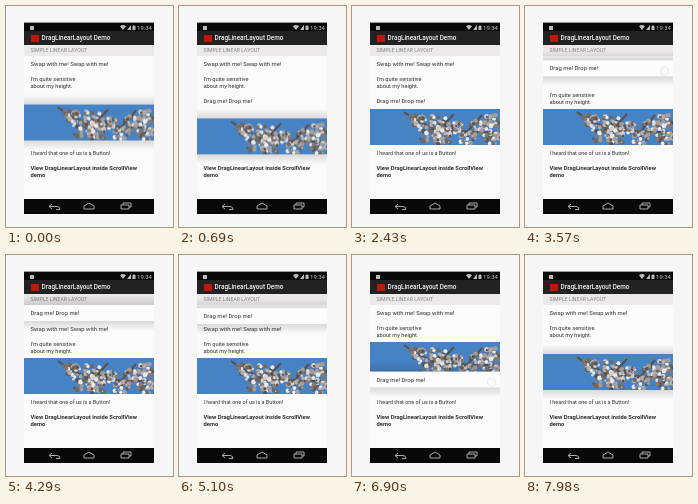
Recreate the animation shown at these times as an HTML page. Size 167 px wide and 221 px high, loop 8 s.

```html
<!DOCTYPE html>
<html lang="en">
<head>
<meta charset="utf-8">
<title>DragLinearLayout Demo</title>
<style>
html, body { margin: 0; width: 100%; height: 100%; overflow: hidden; background: #f6f6f6; }
body { position: relative; font-family: Roboto, sans-serif; color: #2c2c2c; }
div, svg { position: absolute; box-sizing: border-box; }
.screen { left: 18px; top: 16px; width: 130px; height: 191.5px; background: #fbfbfb; overflow: hidden; }
.status { left: 0; top: 0; width: 130px; height: 9px; background: #080808; border-top: 0.6px solid #999; z-index: 9; }
.clock { right: 2px; top: 1px; font-size: 6px; line-height: 8px; color: #ccc; }
.bar { left: 0; top: 9px; width: 130px; height: 14px; background: #222; color: #f2f2f2; z-index: 9;
  font-size: 6.4px; font-weight: 500; line-height: 14px; padding-left: 17.6px; white-space: nowrap; }
.icon { left: 7px; top: 3.5px; width: 8px; height: 7px; background: #c0160e; }
.section { left: 0; top: 23px; width: 130px; height: 11px; background: #ebe9ea; color: #858585;
  font-size: 5.15px; line-height: 11px; padding-left: 6.5px; white-space: nowrap; }
.nav { left: 0; top: 177px; width: 130px; height: 15px; background: #080808; z-index: 9; }
.nav svg { top: -1px; }

.row { left: 0; width: 130px; height: 16px; padding-left: 6.5px; font-size: 5.9px; line-height: 16px;
  white-space: nowrap; animation: 8s linear infinite; }
.two { line-height: 6.5px; padding-top: 4px; height: 21px; }
.swap { top: 34px; animation-name: swap; }
.quite { top: 50px; font-size: 5.65px; animation-name: quite; }
.drag { top: 71px; animation: drag 8s linear infinite, drag-lift 8s step-end infinite; }
.photo { top: 87px; height: 36px; padding: 0; animation: photo 8s linear infinite, photo-lift 8s step-end infinite; }
.heard { top: 123px; font-size: 5.45px; animation-name: heard; }
.view { top: 139px; font-weight: 700; font-size: 5.8px; }
.photo svg { left: 0; top: 0; }
.ring { left: 117px; top: 6px; width: 9px; height: 9px; border: 1px solid #e1e6ee; border-radius: 50%;
  opacity: 0; animation: ring 8s linear infinite; }

/* Soft shadows above and below a lifted row */
.drag::before, .drag::after, .photo::before, .photo::after {
  content: ""; position: absolute; left: 0; width: 130px; height: 10px; animation: 8s linear infinite; }
.row::before { bottom: 100%; background: linear-gradient(to top, #0002, #0000); }
.row::after { top: 100%; background: linear-gradient(#0002, #0000); }
.drag::before, .drag::after { animation-name: drag-shade; }
.photo::before, .photo::after { animation-name: photo-shade; }

@keyframes swap {
  0%, 43.5% { transform: translateY(0); animation-timing-function: ease-in-out; }
  46.5%, 65.8% { transform: translateY(16px); animation-timing-function: ease-in-out; }
  69%, 100% { transform: translateY(0); }
}
@keyframes quite {
  0%, 38.5% { transform: translateY(0); animation-timing-function: ease-in-out; }
  41.5%, 72.4% { transform: translateY(16px); animation-timing-function: ease-in-out; }
  75.5%, 100% { transform: translateY(0); }
}
@keyframes heard {
  0%, 8% { transform: translateY(0); animation-timing-function: ease-in-out; }
  11%, 19.2% { transform: translateY(-36px); animation-timing-function: ease-in-out; }
  22.5%, 100% { transform: translateY(0); }
}
@keyframes drag {
  0% { transform: translateY(36px); animation-timing-function: ease-in-out; }
  3.5%, 32% { transform: translateY(0); animation-timing-function: ease-in; }
  40.5% { transform: translateY(-17px); }
  44.6% { transform: translateY(-32.5px); animation-timing-function: ease-out; }
  48.5% { transform: translateY(-40px); animation-timing-function: ease-in-out; }
  54%, 60% { transform: translateY(-37px); animation-timing-function: ease-in; }
  63.75% { transform: translateY(-34px); }
  86.25% { transform: translateY(29.5px); animation-timing-function: ease-out; }
  89.5%, 100% { transform: translateY(36px); }
}
@keyframes photo {
  0% { transform: translateY(-4.5px); }
  8% { transform: translateY(8px); animation-timing-function: ease-out; }
  12%, 17.5% { transform: translateY(13.5px); animation-timing-function: ease-in-out; }
  20.6% { transform: translateY(2px); animation-timing-function: ease-out; }
  24%, 82.6% { transform: translateY(0); animation-timing-function: ease-in-out; }
  85.8%, 92.5% { transform: translateY(-16px); animation-timing-function: ease-in; }
  99.75%, 100% { transform: translateY(-4px); }
}
@keyframes photo-lift {
  0% { z-index: 5; }
  25% { z-index: 1; }
  91.5%, 100% { z-index: 5; }
}
@keyframes drag-lift {
  0% { z-index: 0; background: transparent; }
  31% { z-index: 4; background: #fcfcfc; }
  90.5%, 100% { z-index: 0; background: transparent; }
}
@keyframes photo-shade {
  0%, 20% { opacity: 1; }
  24%, 91.5% { opacity: 0; }
  94%, 100% { opacity: 1; }
}
@keyframes drag-shade {
  0%, 31% { opacity: 0; }
  34%, 87% { opacity: 1; }
  90%, 100% { opacity: 0; }
}
@keyframes ring {
  0%, 31% { opacity: 0; }
  33%, 50% { opacity: 1; }
  54%, 68% { opacity: 0; }
  72%, 88% { opacity: 1; }
  90%, 100% { opacity: 0; }
}
</style>
</head>
<body>
<div class="screen">
  <div class="status">
    <svg width="130" height="9" fill="#bbb">
      <path d="M6 3h4v4h-4ZM96 3.2Q99 1 102 3.2L99 7ZM107 7V2L103 7ZM108.5 3h1v-.7h1V3h1v4h-3Z"/>
    </svg>
    <div class="clock">19:34</div>
  </div>
  <div class="bar"><div class="icon"></div>DragLinearLayout Demo</div>
  <div class="section">SIMPLE LINEAR LAYOUT</div>

  <div class="row swap">Swap with me! Swap with me!</div>
  <div class="row two quite">I'm quite sensitive<br>about my height.</div>
  <div class="row drag">Drag me! Drop me!<div class="ring"></div></div>
  <div class="row photo">
    <svg width="130" height="36" viewBox="0 0 130 36">
      <rect width="130" height="36" fill="#4683c4"/>
      <path d="M34 3Q52 17 70 20T130 23M70 20L84 5M98 22L112 6" fill="none" stroke="#5b4f47" stroke-width="2"/>
      <g id="blossoms"></g>
    </svg>
  </div>
  <div class="row heard">I heard that one of us is a Button!</div>
  <div class="row two view">View DragLinearLayout inside ScrollView<br>demo</div>

  <div class="nav">
    <svg width="130" height="17" fill="none" stroke="#aaa" stroke-width="1">
      <path d="M28 6l-3 2.5 3 2.5M25 8.5h8q3 0 3 3h-4M60 11V8l5-3 5 3v3ZM97 7h8v4h-8ZM99 7V5h8v4h-2"/>
    </svg>
  </div>
</div>
<script>
// Blossom clusters: x, y, radius
const clusters = [[48, 11, 8], [57, 24, 10], [68, 13, 9], [73, 29, 9], [85, 20, 9],
  [97, 29, 8], [108, 19, 9], [122, 12, 8], [122, 28, 9]];
const tones = ['#d8cfcb', '#a69c98', '#857a74', '#5d5249', '#efe9e6', '#b8aeaa', '#72675f'];
let seed = 7;
const random = () => (seed = seed * 16807 % 2147483647) / 2147483647;

document.getElementById('blossoms').innerHTML = clusters.map(([x, y, r]) =>
  Array.from({ length: 28 }, (_, i) => {
    const angle = random() * Math.PI * 2;
    const reach = Math.sqrt(random()) * r;
    const cx = (x + Math.cos(angle) * reach).toFixed(1);
    const cy = (y + Math.sin(angle) * reach * 0.85).toFixed(1);
    return `<circle cx="${cx}" cy="${cy}" r="${(1 + random() * 1.5).toFixed(1)}" fill="${tones[i % tones.length]}"/>`;
  }).join('')).join('');
</script>
</body>
</html>
```
